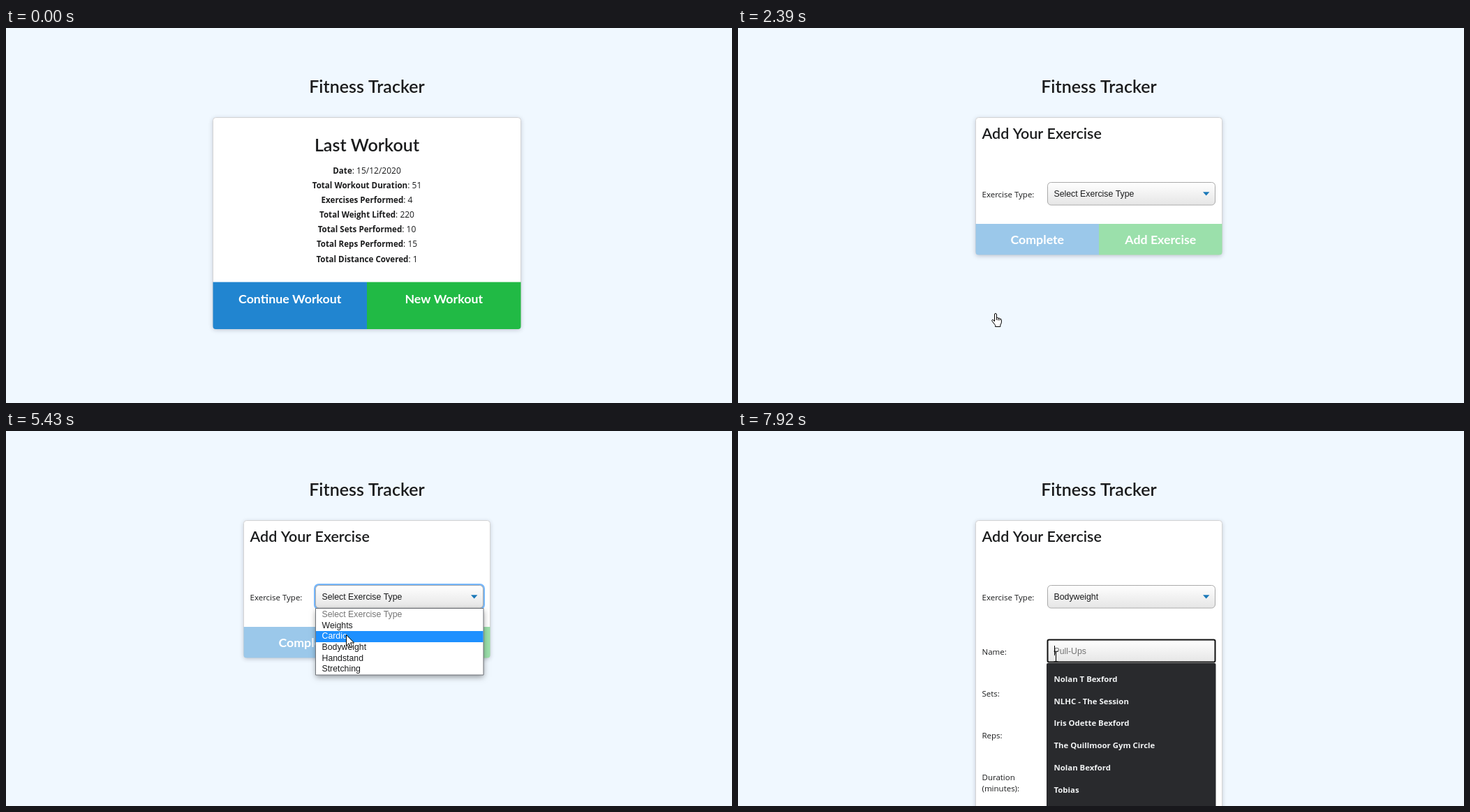
An HTML page with a canvas that plays this animation: 1040 px wide and 538 px high, repeating every 8000 ms.

```html
<!DOCTYPE html>
<html lang="en">
<head>
<meta charset="utf-8">
<title>Fitness Tracker</title>
<style>
  html, body { margin: 0; width: 100%; height: 100%; overflow: hidden; background: #f0f8ff; }
  canvas { display: block; width: 1040px; height: 538px; }
</style>
</head>
<body>
<canvas id="stage"></canvas>
<script>
const W = 1040, H = 538, LOOP = 8000, MID = 517;
const canvas = document.getElementById('stage');
const ctx = canvas.getContext('2d');
const dpr = window.devicePixelRatio || 1;
canvas.width = W * dpr;
canvas.height = H * dpr;

const lato = (size, weight) => `${weight} ${size}px Lato, sans-serif`;
const sans = (size, weight = 400) => `${weight} ${size}px "Open Sans", "Noto Sans", sans-serif`;
const ARIAL = '12.3px "Liberation Sans", Arial, sans-serif';
const LABEL = sans(11.5);

const INK = '#1b1c1d';
const BLUE = '#2185d0', BLUE_HOVER = '#1678c2', BLUE_OFF = '#9bc8ea';
const GREEN = '#21ba45', GREEN_HOVER = '#16ab39', GREEN_OFF = '#9be0ab';

const STATS = [
  ['Date', '15/12/2020'], ['Total Workout Duration', 51], ['Exercises Performed', 4],
  ['Total Weight Lifted', 220], ['Total Sets Performed', 10],
  ['Total Reps Performed', 15], ['Total Distance Covered', 1]
];
const OPTIONS = ['Select Exercise Type', 'Weights', 'Cardio', 'Bodyweight', 'Handstand', 'Stretching'];
const LABELS = ['Name:', 'Sets:', 'Reps:', 'Duration'];
const SUGGESTIONS = ['Nolan T Bexford', 'NLHC - The Session', 'Iris Odette Bexford',
  'The Quillmoor Gym Circle', 'Nolan Bexford', 'Tobias'];

const SHOW = 210, NEW_PAGE = 2390, OPEN = 3460, PICK = 6830, FOCUS = 7760, SUGGEST = 7840;

// Pointer glides: start, end, and the point reached.
const GLIDES = [
  [280, 280, 946, 200], [450, 920, 291, 439], [996, 1070, 445, 403], [1150, 1380, 640, 390],
  [1460, 1840, 368, 409], [2850, 3390, 492, 238], [3690, 4470, 491, 316],
  [4560, 4880, 490, 345], [4960, 5430, 487, 292], [5510, 5670, 487, 279],
  [6070, 6530, 491, 301], [6600, 6680, 491, 305], [6900, 7460, 381, 312],
  [7610, 7760, 455, 323]
];
const UPDATE = 77;

// The pointer advances in even steps, one per screen update.
function pointerAt(t) {
  const p = { x: 954, y: 206 };
  for (const [start, end, x, y] of GLIDES) {
    if (t < start) break;
    const n = Math.round((end - start) / UPDATE);
    const step = t >= end ? n : Math.floor((t - start) / (end - start) * n + 0.05);
    const k = (step + 1) / (n + 1);
    p.x = Math.round(p.x + (x - p.x) * k);
    p.y = Math.round(p.y + (y - p.y) * k);
  }
  return p;
}

const inside = (p, x, y, w, h) => p.x >= x && p.x < x + w && p.y >= y && p.y < y + h;

function text(str, x, y, font, color = INK, align = 'left') {
  ctx.font = font;
  ctx.fillStyle = color;
  ctx.textAlign = align;
  ctx.fillText(str, x, y);
}

function box(x, y, w, h, r, fill, stroke, line = 1) {
  ctx.beginPath();
  ctx.roundRect(x, y, w, h, r);
  if (fill) { ctx.fillStyle = fill; ctx.fill(); }
  if (stroke) { ctx.strokeStyle = stroke; ctx.lineWidth = line; ctx.stroke(); }
}

function shadow(color, blur, dy, draw) {
  ctx.save();
  ctx.shadowColor = color;
  ctx.shadowBlur = blur * dpr;
  ctx.shadowOffsetY = dy * dpr;
  draw();
  ctx.restore();
}

function card(w, h) {
  const x = MID - w / 2;
  shadow('rgba(34,36,60,.25)', 6, 1.5, () => box(x, 128.5, w, h, 4, '#fff'));
  box(x, 128.5, w, h, 4, null, '#d4d4d5');
}

function buttonPair(width, y, bottom, base, ...buttons) {
  const w = width / 2;
  buttons.forEach(([label, color], i) => {
    const x = MID - w + i * w;
    box(x, y, w, bottom - y, i ? [0, 0, 4, 0] : [0, 0, 0, 4], color);
    text(label, x + w / 2, base, lato(17.8, 700), '#fff', 'center');
  });
}

function stat([label, value], i) {
  const y = 208.5 + i * 21.17, rest = ': ' + value;
  const bold = sans(11.6, 700), plain = sans(12);
  ctx.font = bold;
  const wide = ctx.measureText(label).width;
  ctx.font = plain;
  const x = MID - (wide + ctx.measureText(rest).width) / 2;
  text(label, x, y, bold);
  text(rest, x + wide, y, plain);
}

function home(p, shown) {
  card(441, 303);
  text('Last Workout', MID, 176.5, lato(25.1, 600), INK, 'center');
  STATS.forEach(stat);
  const over = x => shown && inside(p, x, 365, 220, 67);
  buttonPair(441, 364.5, 432, 395,
    ['Continue Workout', over(297) ? BLUE_HOVER : BLUE],
    ['New Workout', over(517) ? GREEN_HOVER : GREEN]);
}

function field(y, h, r, stroke = '#aaa', line = 1) {
  const g = ctx.createLinearGradient(0, y, 0, y + h);
  g.addColorStop(0, '#fff');
  g.addColorStop(1, '#e5e5e5');
  box(443.5, y + 0.5, 240, h - 1, r, g, stroke, line);
}

function select(label, focused) {
  if (focused) box(441, 219, 245, 37.5, 7, '#76b7fb');
  field(221, 33.5, 5);
  text(label, 452.5, 242, ARIAL);
  ctx.fillStyle = '#1a78b8';
  ctx.fill(new Path2D('M666 235.3h9.4l-4.7 5.2z'));
}

function menu(p) {
  const top = 255.3, row = 15.65;
  shadow('rgba(0,0,0,.4)', 8, 3, () => box(443.5, 254.5, 240.5, 95.5, 0, '#fff'));
  box(443.5, 254.5, 240.5, 95.5, 0, null, '#6f7378');
  const active = Math.floor((p.y - top) / row);
  OPTIONS.forEach((name, i) => {
    const on = i > 0 && i === active;
    if (on) {
      ctx.fillStyle = '#1e90ff';
      ctx.fillRect(444, Math.round(top + i * row), 239.5, 16);
    }
    text(name, 452.5, 267 + i * row, ARIAL, on ? '#fff' : i ? INK : '#757575');
  });
}

function details(t) {
  LABELS.forEach((label, i) => {
    text(label, 349.5, 320.5 + i * 60, LABEL);
    field(299 + i * 60, 33, 3);
  });
  text('(minutes):', 349.5, 517, LABEL);
  if (t >= FOCUS) field(299, 33, 2, '#101010', 2);
  text('Pull-Ups', 452.5, 319.5, ARIAL, '#757575');
  if (t >= FOCUS) {
    ctx.fillStyle = '#000';
    ctx.fillRect(453, 308, 1, 14);
  }
  if (t >= SUGGEST) {
    box(442, 333, 242.5, H, 2, '#292a2d');
    SUGGESTIONS.forEach((s, i) => text(s, 452.5, 360 + i * 31.7, sans(11.4, 700), '#f1f3f4'));
  }
}

function form(t, p) {
  const picked = t >= PICK;
  card(353, picked ? H : 197);
  text('Add Your Exercise', 349.5, 159, lato(21.5, 600));
  text('Exercise Type:', 349.5, 243, LABEL);
  if (!picked) {
    buttonPair(353, 281, 325.5, 310, ['Complete', BLUE_OFF], ['Add Exercise', GREEN_OFF]);
  }
  select(picked ? OPTIONS[3] : OPTIONS[0], t >= OPEN && t < FOCUS);
  if (picked) details(t);
  else if (t >= OPEN) menu(p);
}

const ARROW = new Path2D('M.5.5V16.2L4.1 12.8 6.6 18.5 9 17.5 6.5 11.9H11.6Z');
const HAND = new Path2D('M4.5 12V2Q4.5.5 5.9.5T7.4 2V6.5Q9.4 5.7 9.8 7.4 11.6 6.6 12.1 8.3 14.3 7.8 14.4 9.8V13Q14.3 15 12.8 17V19.5H5.6V17.4L1.2 11.8Q0 9.8 1.6 9.4 2.7 9.2 4.5 12Z');
const KNUCKLES = new Path2D('M7.4 6.5V10M9.8 7.4V10.5M12.1 8.3V10.5');
const BEAM = new Path2D('M-3-7.5H-1L0-6.5 1-7.5H3M0-6.5V6.5M-3 7.5H-1L0 6.5 1 7.5H3');

function pointer(t, p) {
  const hand = t < NEW_PAGE ? inside(p, 297, 365, 440, 67) : t < GLIDES[5][0];
  const beam = t >= PICK && LABELS.some((_, i) => inside(p, 443, 299 + i * 60, 241, 33));
  ctx.save();
  ctx.lineWidth = 1;
  ctx.strokeStyle = '#000';
  ctx.fillStyle = '#fff';
  if (beam) {
    ctx.translate(p.x + 0.5, p.y + 0.5);
    ctx.stroke(BEAM);
  } else {
    const shape = hand ? HAND : ARROW;
    ctx.translate(p.x - (hand ? 5 : 0), p.y);
    ctx.fill(shape);
    ctx.stroke(shape);
    if (hand) ctx.stroke(KNUCKLES);
  }
  ctx.restore();
}

function render(t) {
  const p = pointerAt(t), shown = t >= SHOW;
  ctx.setTransform(dpr, 0, 0, dpr, 0, 0);
  ctx.fillStyle = '#f0f8ff';
  ctx.fillRect(0, 0, W, H);
  text('Fitness Tracker', MID, 93, lato(25, 600), INK, 'center');
  if (t < NEW_PAGE) home(p, shown);
  else form(t, p);
  if (shown) pointer(t, p);
}

const begin = performance.now();
function tick() {
  render((performance.now() - begin) % LOOP);
  requestAnimationFrame(tick);
}
tick();
</script>
</body>
</html>
```
